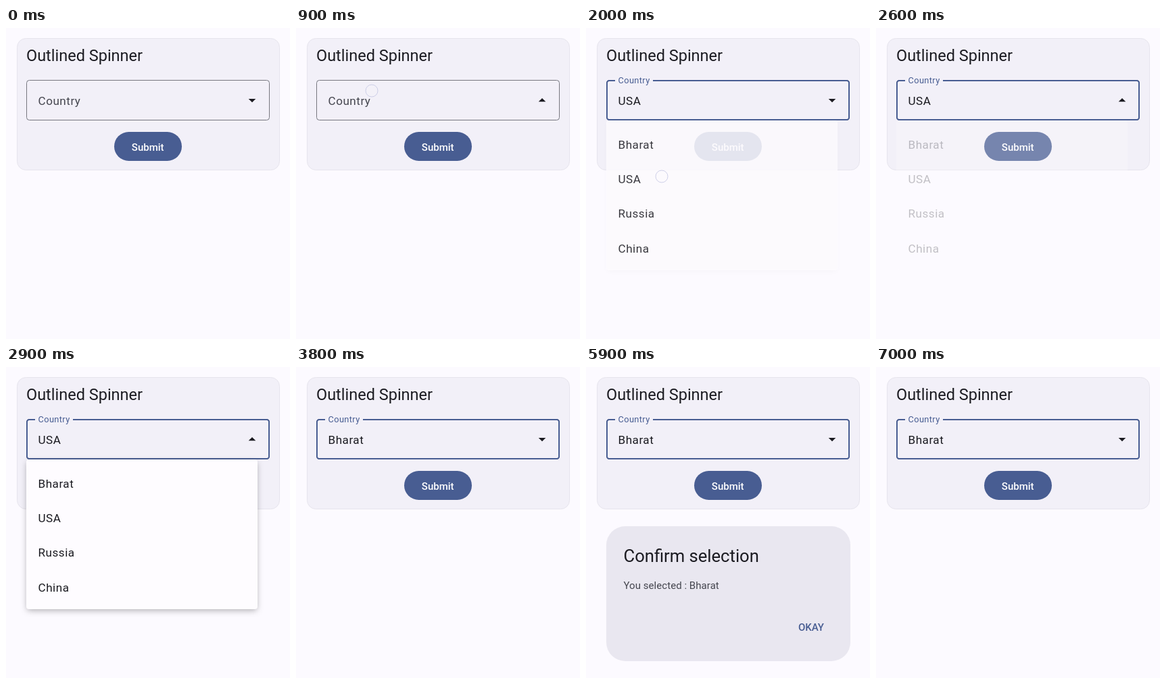
An HTML page for the animation above (7.1 s loop, 420x461 px).

```html
<!DOCTYPE html>
<html lang="en">
<head>
<meta charset="utf-8">
<title>Outlined Spinner</title>
<style>
html, body { margin: 0; width: 100%; height: 100%; overflow: hidden; background: #fcfaff; }
svg { display: block; width: 420px; height: 461px; font-family: Roboto, sans-serif; fill: #1b1b21; }
.body { font-size: 17.1px; letter-spacing: .03em; }
.button { font-size: 15px; font-weight: 500; }
#label { letter-spacing: .03em; }
#shadow { fill: #8d8b98; filter: drop-shadow(0 3px 5px rgba(0, 0, 0, .3)); }
</style>
</head>
<body>
<svg viewBox="0 0 420 461">
  <rect x="16.5" y="15.5" width="388" height="195" rx="13" fill="#f2f0f8" stroke="#e6e4ed"/>
  <text x="30" y="49" font-size="23.5">Outlined Spinner</text>

  <rect x="30.5" y="77.5" width="359" height="59" rx="4" fill="none" stroke="#77777f"/>
  <rect id="focus" x="31" y="78" width="358" height="58" rx="3.5" fill="none" stroke="#485d92" stroke-width="2"/>
  <rect id="gap" y="76" height="4" fill="#f2f0f8"/>
  <text id="label" x="47.5">Country</text>
  <text id="value" class="body" x="47.5" y="114.3"></text>
  <path id="arrow"/>

  <rect x="160" y="154" width="100" height="43" rx="21.5" fill="#485d92"/>
  <rect id="ripple" x="160" y="154" width="100" height="43" rx="21.5" fill="#fff"/>
  <text class="button" x="209.7" y="181.7" text-anchor="middle" fill="#fff">Submit</text>

  <rect id="shadow" x="31" y="138" width="340" height="220" rx="4"/>
  <g id="menu" class="body">
    <rect x="30" y="137" width="342" height="222" rx="4" fill="#fefcff"/>
    <rect id="row" x="30" width="342" height="51.3" fill="#1b1b21" opacity=".08"/>
  </g>

  <g id="dialog">
    <rect x="30" y="236" width="361" height="200" rx="28" fill="#e9e7f0"/>
    <text x="55.5" y="289" font-size="25.6">Confirm selection</text>
    <text x="55.5" y="329" font-size="15" letter-spacing=".05" fill="#45464f">You selected : Bharat</text>
    <text class="button" x="314" y="390.6" fill="#485d92">OKAY</text>
  </g>
  <circle id="touch" r="9" fill="#fff" fill-opacity=".12" stroke="#bfc2e0" stroke-opacity=".75"/>
</svg>
<script>
const LOOP = 7100, ROW = 51.3;
const $ = id => document.getElementById(id);
const set = (id, attrs) => { for (const k in attrs) $(id).setAttribute(k, attrs[k]); };
const ramp = (t, from, to) => Math.min(1, Math.max(0, (t - from) / (to - from)));
const within = (t, from, to) => t >= from && t < to;
const mix = (a, b, p) => a + (b - a) * p;
const ease = p => p * p * (3 - 2 * p);

// start, end, x, y
const touches = [
  [800, 960, 112, 93], [1700, 2060, 112, 220], [2400, 2560, 112, 100],
  [3200, 3540, 112, 172], [4500, 4760, 197, 173], [6000, 6160, 333, 386]
];

["Bharat", "USA", "Russia", "China"].forEach((name, i) => {
  const item = document.createElementNS("http://www.w3.org/2000/svg", "text");
  item.setAttribute("x", 47.5);
  item.setAttribute("y", 178.7 + i * ROW);
  item.textContent = name;
  $("menu").append(item);
});

function draw(t) {
  const focused = ease(ramp(t, 930, 1090));
  set("focus", { opacity: ramp(t, 930, 990) });
  set("gap", { x: 71 - 28 * focused, width: 56 * focused });
  set("label", {
    y: mix(114.3, 82.3, focused),
    "font-size": mix(17.1, 12.8, focused),
    fill: focused ? "#485d92" : "#45464f"
  });
  $("value").textContent = t < 1960 ? "" : t < 3480 ? "USA" : "Bharat";

  const open = within(t, 880, 1960) || within(t, 2480, 3480);
  set("arrow", { d: open ? "M358.7 109.3h10.6l-5.3-5.3z" : "M358.7 105h10.6l-5.3 5.3z" });

  const shown = ramp(t, 950, 1150) - ramp(t, 1971, 2180)
    + ramp(t, 2550, 2750) - ramp(t, 3480, 3690);
  set("menu", { opacity: shown });
  set("shadow", { opacity: shown ** 16 });
  set("row", {
    y: t < 2400 ? 147 + ROW : 147,
    visibility: within(t, 1700, 1950) || within(t, 3200, 3480) ? "visible" : "hidden"
  });

  set("ripple", { opacity: .1 * (ramp(t, 4500, 4600) - ramp(t, 4750, 4950)) });
  set("dialog", {
    opacity: ramp(t, 4630, 4714) - ramp(t, 6150, 6300),
    transform: `translate(0 ${3 * (1 - ease(ramp(t, 4700, 4860)))})`
  });

  const touch = touches.find(([from, to]) => within(t, from, to));
  set("touch", touch
    ? { cx: touch[2], cy: touch[3], visibility: "visible" }
    : { visibility: "hidden" });
}

const start = performance.now();
function tick() {
  draw((performance.now() - start) % LOOP);
  requestAnimationFrame(tick);
}
tick();
</script>
</body>
</html>
```
